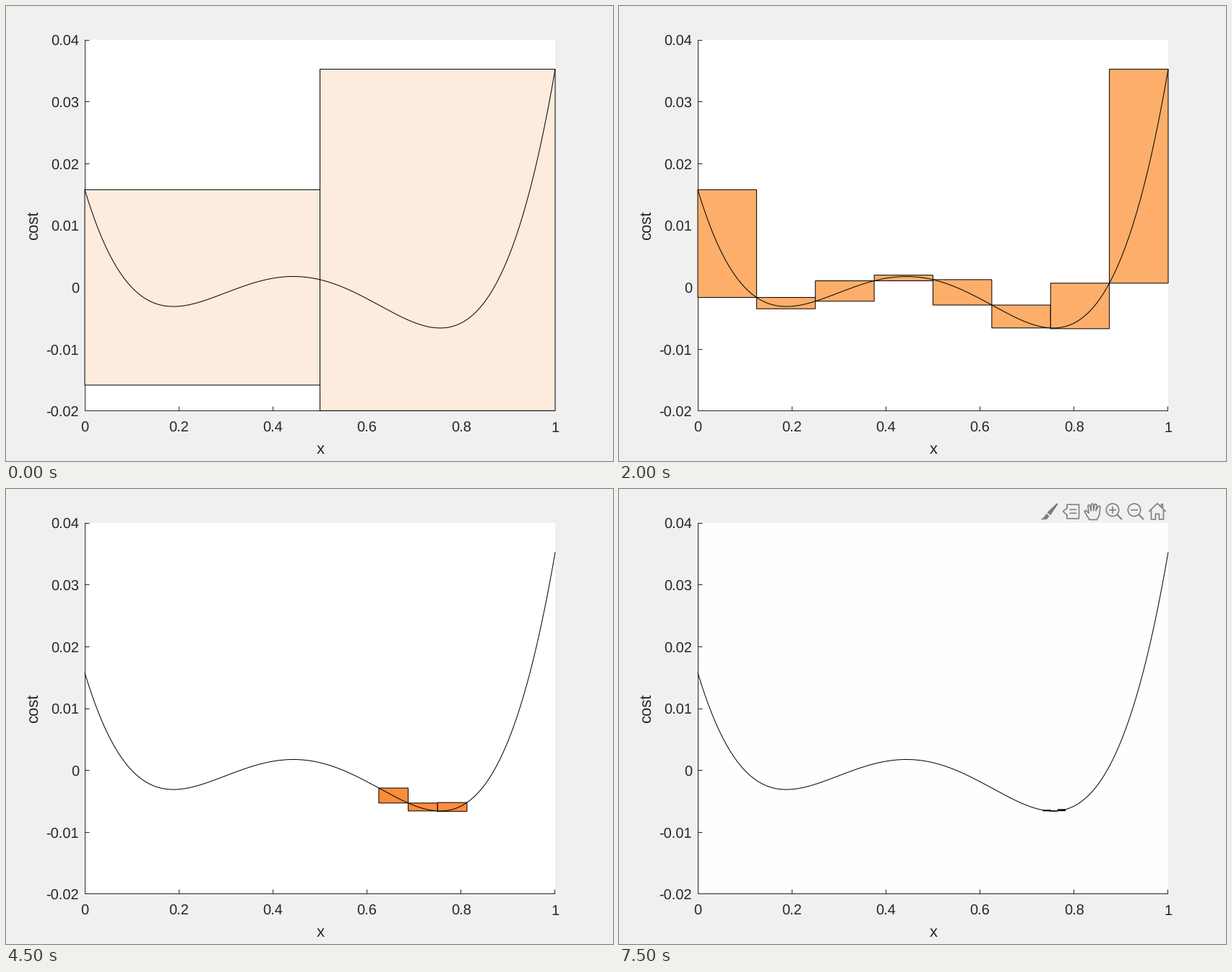
Write a matplotlib script that moves like this. It is 840 by 630 pixels and loops after 8 s.

```python
from math import comb, floor

import matplotlib.pyplot as plt
import numpy as np
from matplotlib.animation import FuncAnimation
from matplotlib.patches import Circle, Polygon, Rectangle

W, H, DPI = 840, 630, 100
PX = 72 / DPI
LEFT, RIGHT, TOP, BOTTOM = 109, 760, 47, 561
Y_MIN, Y_MAX = -0.02, 0.04
INK, ICON = "#262626", "#7d7d7d"
ORANGES = ["#fdebdd", "#fdd0a2", "#fdae6b", "#fd8d3c", "#e6550d", "#a63603"]
COST = np.poly1d([0.1, 0.33, 0.55, 0.87], r=True)


def to_x(x):
    return LEFT + (RIGHT - LEFT) * x


def to_y(y):
    return TOP + (Y_MAX - y) / (Y_MAX - Y_MIN) * (BOTTOM - TOP)


def cell(v, end):
    """Centre of the pixel that holds v, at most the last one before end."""
    return min(floor(v + 1e-6), end - 1) + 0.5


def bounds(a, b):
    """Enclose the cost on [a, b] by its Bernstein coefficients."""
    power = COST(np.poly1d([b - a, a])).coeffs[::-1]
    n = len(power) - 1
    bern = [sum(comb(i, k) / comb(n, k) * power[k] for k in range(i + 1))
            for i in range(n + 1)]
    return min(bern), max(bern)


def split(intervals):
    halves = []
    for a, b in intervals:
        mid = (a + b) / 2
        halves += [(a, mid), (mid, b)]
    return halves


def prune(intervals):
    best = min(bounds(*i)[1] for i in intervals)
    return [i for i in intervals if bounds(*i)[0] <= best + 1e-9]


# Each state: level, intervals, background, toolbar shown
active = split([(0, 1)])
states = [(0, active, "#ffffff", False)]
for level in range(1, len(ORANGES)):
    active = split(active)
    kept = prune(active)
    last = level == len(ORANGES) - 1
    states += [(level, active, "#ffffff", False),
               (level, active, "#fdfdfd", False),
               (level, kept, "#fefefe" if last else "#ffffff", last)]
    active = kept

plt.rcParams["font.family"] = "Liberation Sans"
plt.rcParams["text.hinting"] = "none"
fig = plt.figure(figsize=(W / DPI, H / DPI), dpi=DPI, facecolor="#f0f0f0")
ax = fig.add_axes([0, 0, 1, 1])
ax.set_xlim(0, W)
ax.set_ylim(H, 0)
ax.axis("off")


def line(xs, ys, color=INK, width=1, z=2, **style):
    return ax.plot(xs, ys, color=color, lw=width * PX, zorder=z, snap=False, **style)[0]


def label(x, y, text, size, align="center", **style):
    ax.text(x, y, text, size=size * PX, color=INK, ha=align, va="baseline", **style)


def draw_axes():
    x0, y0 = cell(LEFT, RIGHT), cell(BOTTOM, BOTTOM)
    line([x0, x0], [cell(TOP, BOTTOM), y0])
    line([x0, cell(RIGHT, RIGHT)], [y0, y0])
    for v in np.linspace(0, 1, 6):
        x = cell(to_x(v), RIGHT)
        line([x, x], [y0, y0 - 5.5])
        label(to_x(v), 590, f"{v:.1g}", 20)
    for v in np.linspace(Y_MIN, Y_MAX, 7).round(2):
        y = cell(to_y(v), BOTTOM)
        line([x0, x0 + 5.5], [y, y])
        label(101, to_y(v) + 8.2, f"{v + 0:g}", 20, "right")
    label((LEFT + RIGHT) / 2 + 0.5, 620, "x", 22)
    label(44, (TOP + BOTTOM) / 2, "cost", 22, rotation=90, rotation_mode="anchor")


def draw_toolbar():
    """Six icons, 30 px apart, each drawn around its own centre."""
    icons = []
    brush, tip, hand, zoom_in, zoom_out, home = range(595, 746, 30)
    cy = 31

    def stroke(cx, points, width=1.6):
        xs, ys = np.transpose(points)
        icons.append(line(cx + xs, cy + ys, ICON, width,
                          solid_joinstyle="round", solid_capstyle="round"))

    def add(patch):
        icons.append(ax.add_patch(patch))

    def blob(cx, points):
        add(Polygon(np.add(points, (cx, cy)), fc=ICON, ec="none", zorder=3))

    blob(brush, [(11, -11.5), (12.5, -10), (2, 5.5), (-2.5, 1.5)])
    blob(brush, [(-3.5, 3), (0.5, 6.5), (-3, 11), (-11.5, 11.5), (-7, 8)])

    stroke(tip, [(-5, -4.5), (-5, -9.5), (11.5, -9.5), (11.5, 10), (-5, 10),
                 (-5, 5), (-10.5, 0), (-5, -4.5)])
    for y in (-2.5, 2.5):
        stroke(tip, [(-1, y), (7.5, y)])

    outline = [(-4, 11.5), (-11, 0), (-9, -1.5), (-5, 2.5)]
    for i in range(4):
        x, y = -4.5 + 4.6 * i, -11 + 1.1 * (i - 1.3) ** 2
        outline += [(x - 1.5, y + 1.5), (x, y), (x + 1.5, y + 1.5)]
        if i < 3:
            outline.append((-2 + 3.4 * i, -1))
    stroke(hand, outline + [(10, 4), (6.5, 11.5), (-4, 11.5)])

    for cx in (zoom_in, zoom_out):
        add(Circle((cx - 2, cy - 2), 8.7, fill=False, ec=ICON, lw=1.6 * PX, zorder=3))
        stroke(cx, [(4.3, 4.3), (10.5, 10.8)], 2)
        stroke(cx, [(-6.5, -2), (2.5, -2)])
    stroke(zoom_in, [(-2, -6.5), (-2, 2.5)])

    stroke(home, [(-11.5, 0), (0, -11), (11.5, 0)])
    for side in (-1, 1):
        stroke(home, [(side * 8.5, -2), (side * 8.5, 11), (side * 2.5, 11),
                      (side * 2.5, 3.5), (0, 3.5)])
    stroke(home, [(7.5, -5), (7.5, -10), (5.5, -10), (5.5, -7)])
    return icons


plot_area = ax.add_patch(Rectangle((LEFT, TOP), RIGHT - LEFT, BOTTOM - TOP,
                                   lw=0, snap=False, zorder=1))
draw_axes()
toolbar = draw_toolbar()
curve_x = np.linspace(0, 1, 401)
line(to_x(curve_x), to_y(COST(curve_x)), "black", z=5, solid_capstyle="butt")
boxes = []


def update(frame):
    level, intervals, background, show_toolbar = states[frame]
    plot_area.set_facecolor(background)
    for icon in toolbar:
        icon.set_visible(show_toolbar)
    while boxes:
        boxes.pop().remove()
    for a, b in intervals:
        low, high = bounds(a, b)
        box = Rectangle((to_x(a), to_y(high)), to_x(b) - to_x(a), to_y(low) - to_y(high),
                        fc=ORANGES[level], ec="black", lw=PX, snap=False, zorder=4)
        boxes.append(ax.add_patch(box))
    return boxes


anim = FuncAnimation(fig, update, frames=len(states), interval=500,
                     repeat=True, repeat_delay=0, blit=False)
plt.show()
```
